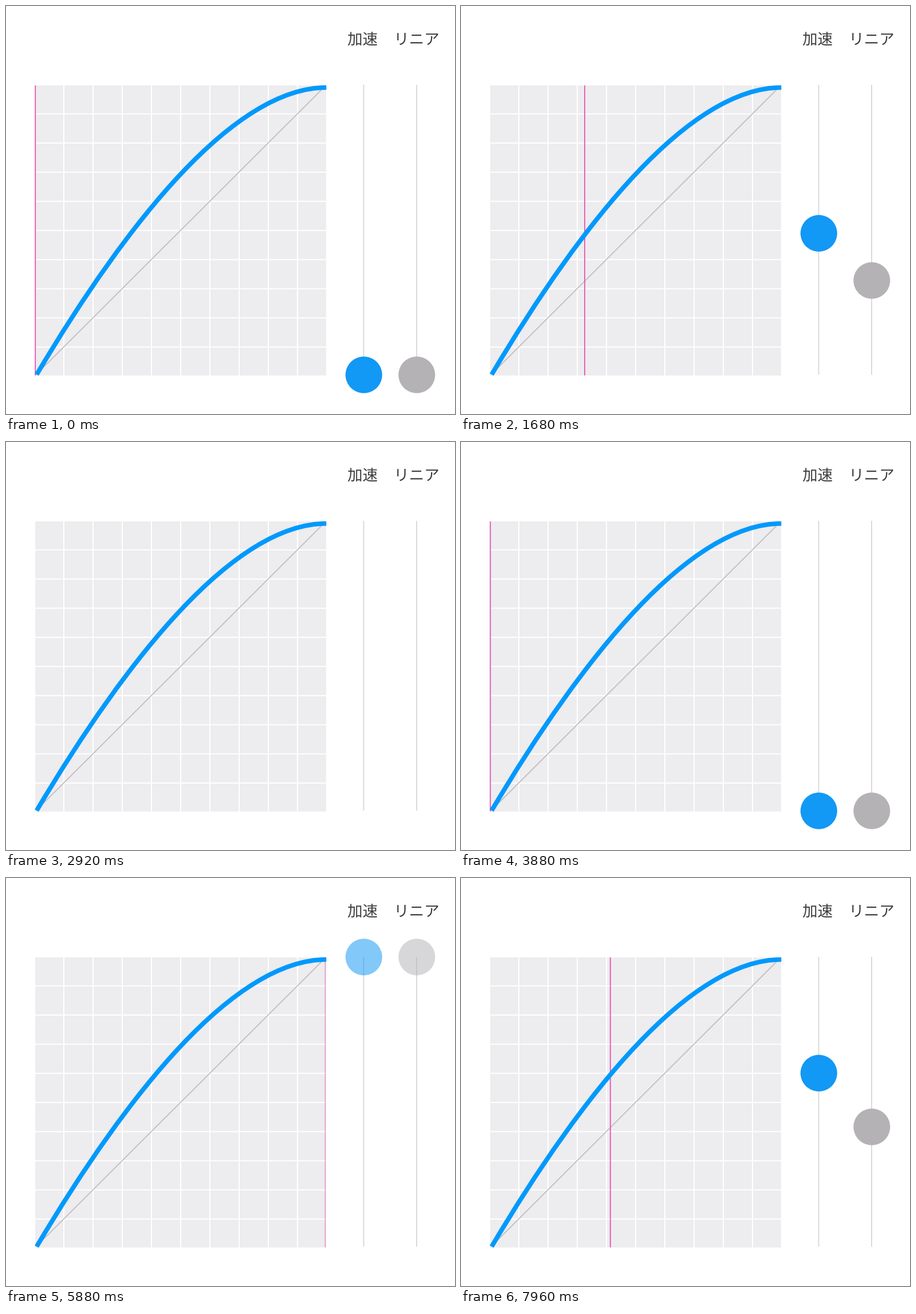
A matplotlib script for the animation above (8 s loop, 784x714 px).

```python
import numpy as np
import matplotlib.pyplot as plt
from matplotlib.animation import FuncAnimation
from matplotlib.patches import Circle, PathPatch, Rectangle
from matplotlib.path import Path
from matplotlib.textpath import TextPath
from matplotlib.transforms import Affine2D

W, H, DPI = 784, 714, 100
STEP, LOOP = 40, 8000

BLUE, CURVE, GRAY = "#1298f5", "#0099fc", "#b4b2b5"
LEFT, RIGHT, TOP, BOTTOM = 51, 559, 139, 646.5

STARTS = (1540, 4708, 7782)         # when each run begins, ms
MOVE, HOLD, FADE = 430, 600, 300
LEAD = 1290                         # reappears this long before a run

fig = plt.figure(figsize=(W / DPI, H / DPI), dpi=DPI, facecolor="white")
ax = fig.add_axes([0, 0, 1, 1])
ax.set_xlim(0, W)
ax.set_ylim(H, 0)
ax.axis("off")


def px(width):
    return width * 72 / DPI


def line(xs, ys, color, width, z):
    return ax.plot(xs, ys, color=color, lw=px(width), zorder=z,
                   solid_capstyle="butt", snap=False)[0]


def label(text, cx, cy, size=26.5):
    path = TextPath((0, 0), text, size=size,
                    prop={"family": "Noto Sans CJK JP"})
    box = path.get_extents()
    mx, my = (box.x0 + box.x1) / 2, (box.y0 + box.y1) / 2
    place = Affine2D().translate(-mx, -my).scale(1, -1).translate(cx, cy)
    ax.add_patch(PathPatch(path.transformed(place), fc="#3e3c3e", lw=0))


def ball(x, color):
    return ax.add_patch(Circle((x, 645.5), 32, fc=color, lw=0, zorder=6))


# Chart
ax.add_patch(Rectangle((LEFT, TOP), RIGHT - LEFT, BOTTOM - TOP,
                       fc="#edecee", lw=0, zorder=1, snap=False))
for k in range(9):
    x, y = 101 + 51 * k, 188.8 + 51 * k
    line([x, x], [TOP, BOTTOM], "white", 2, 2)
    line([LEFT, RIGHT], [y, y], "white", 2, 2)
line([52.5, 557], [645, 140.5], "#bebcbf", 1.7, 3)

bend = Path([(53.5, 645), (214, 374), (400, 142.7), (559.3, 142.7)],
            [Path.MOVETO] + [Path.CURVE4] * 3)
ax.add_patch(PathPatch(bend, fc="none", ec=CURVE, lw=px(8), zorder=5,
                       capstyle="butt"))

# Tracks and labels
for x in (624.5, 717):
    line([x, x], [138, 645], "#d9d9d9", 1.9, 3)
label("加速", 622.5, 57.3)
label("リニア", 719, 57.7)

marker = line([51.2, 51.2], [TOP, BOTTOM], "#e455b4", 1.8, 4)
eased = ball(624.8, BLUE)
linear = ball(717.3, GRAY)

s = np.linspace(0, 1, 400)
EASE_X = 3 * (1 - s)**2 * s * 0.305 + 3 * (1 - s) * s**2 * 0.68 + s**3
EASE_Y = 3 * (1 - s)**2 * s * 0.51 + 3 * (1 - s) * s**2 + s**3


def ramp(t, start, length):
    return min(max((t - start) / length, 0), 1)


def state(t):
    """Linear progress and opacity at time t."""
    for i, start in enumerate(STARTS):
        appear = start - LEAD
        gone = start + MOVE + HOLD
        if t < gone + FADE:
            shown = 1 if i == 0 else ramp(t, appear, FADE)
            return ramp(t, start, MOVE), shown * (1 - ramp(t, gone, FADE))
    return 0, 0


def draw(i):
    p, alpha = state(i * STEP)
    x = 51.2 + 506.3 * p
    marker.set_xdata([x, x])
    eased.center = (624.8, 645.5 - 507.2 * np.interp(p, EASE_X, EASE_Y))
    linear.center = (717.3, 645.5 - 507.2 * p)
    for part in (marker, eased, linear):
        part.set_alpha(alpha)
    return marker, eased, linear


anim = FuncAnimation(fig, draw, frames=LOOP // STEP, interval=STEP,
                     init_func=lambda: draw(0), repeat=True, repeat_delay=0)
plt.show()
```
